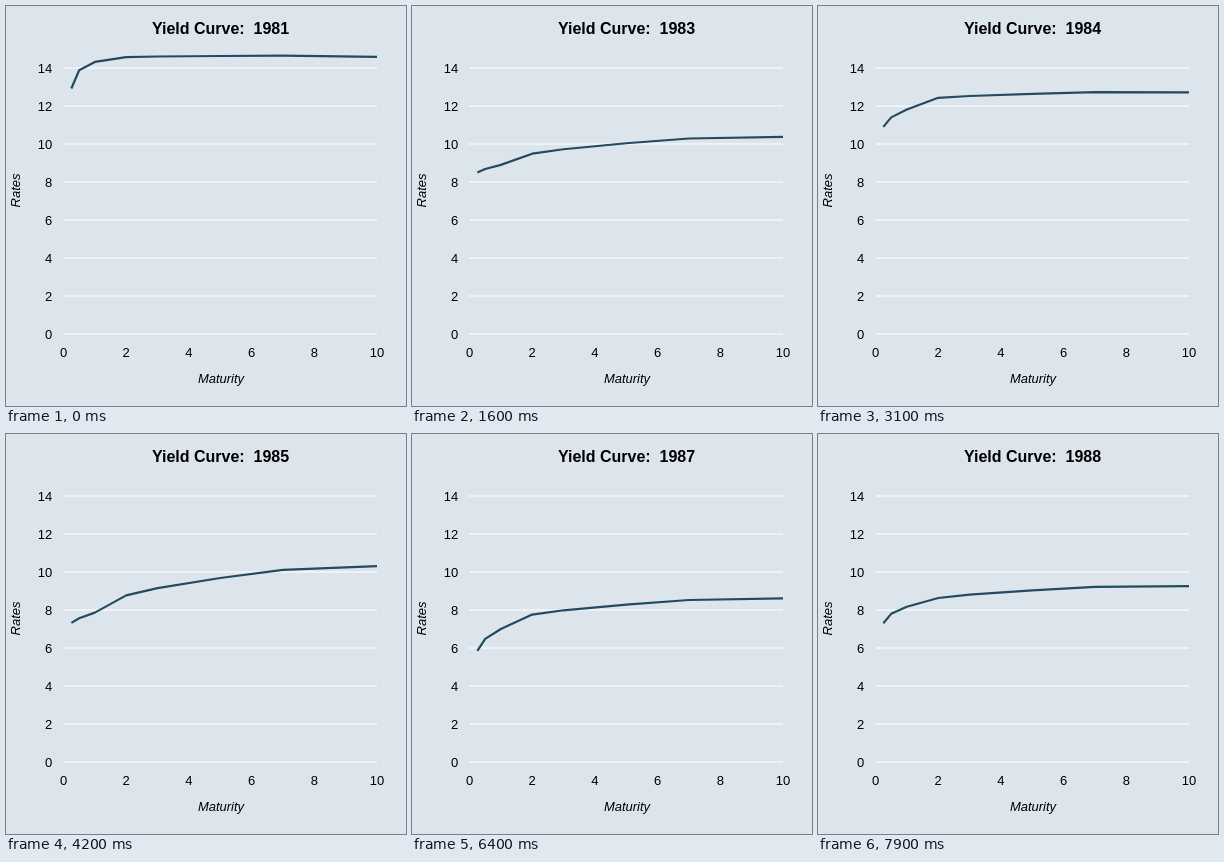
An HTML page for the animation above (8 s loop, 400 by 400 pixels).

```html
<!DOCTYPE html>
<html lang="en">
<head>
<meta charset="utf-8">
<title>Yield Curve</title>
<style>
  html, body { margin: 0; width: 100%; height: 100%; overflow: hidden; background: #dde5ec; }
  svg { display: block; width: 400px; height: 400px; }
  text { font: 13px "Liberation Sans", Arial, sans-serif; fill: #000; text-anchor: middle; white-space: pre; }
  .title { font-size: 16px; font-weight: bold; }
  .axis { font-style: italic; }
  .end { text-anchor: end; }
  .grid { stroke: #f6f8fa; stroke-width: 1.6; }
  .curve { fill: none; stroke: #234b60; stroke-width: 2.2; stroke-linejoin: round; }
</style>
</head>
<body>
<svg viewBox="0 0 400 400">
  <text class="title" id="title" x="214.5" y="28"></text>
  <g id="axes"></g>
  <text class="axis" x="215" y="377">Maturity</text>
  <text class="axis" transform="translate(14 184.5) rotate(-90)">Rates</text>
  <polyline class="curve" id="curve"/>
</svg>
<script>
const STEP = 100, MONTHS = 80, FIRST_YEAR = 1981;
const MATURITIES = [0.25, 0.5, 1, 2, 3, 5, 7, 10];

// Turning points: month, then the 3-month, 1-year, 2-year and 10-year rates
const turns = [
  [0, 12.92, 14.32, 14.57, 14.59],
  [4, 12.71, 13.34, 13.78, 13.62],
  [5, 13.08, 14.07, 14.47, 14.3],
  [9, 7.97, 9.32, 10.19, 10.91],
  [16, 8.5, 8.9, 9.49, 10.38],
  [19, 9.74, 10.53, 11.07, 11.85],
  [24, 9.26, 9.9, 10.64, 11.67],
  [29, 10.26, 12.08, 12.91, 13.56],
  [31, 10.9, 11.82, 12.43, 12.72],
  [35, 8.34, 9.33, 10.18, 11.5],
  [38, 8.83, 9.86, 10.71, 11.86],
  [42, 7.32, 7.86, 8.77, 10.31],
  [45, 7.4, 8.01, 8.86, 10.24],
  [51, 6.24, 6.44, 6.7, 7.3],
  [55, 5.69, 5.93, 6.33, 7.17],
  [62, 5.77, 6.03, 6.42, 7.25],
  [64, 5.85, 7, 7.76, 8.61],
  [69, 6.35, 7.59, 8.4, 9.52],
  [73, 5.84, 6.64, 7.18, 8.21],
  [79, 7.3, 8.17, 8.63, 9.26]
];

const px = m => 57.5 + m * 31.35;
const py = r => 328 - r * 19;
const mix = (a, b, t) => a + (b - a) * t;

function ratesAt(month) {
  const k = Math.max(1, turns.findIndex(p => p[0] >= month));
  const a = turns[k - 1], b = turns[k];
  const t = (month - a[0]) / (b[0] - a[0]);
  const [, m3, y1, y2, y10] = a.map((v, i) => mix(v, b[i], t));

  // The steeper the first year, the sooner the short end bends
  const steep = (y1 - m3) / (y2 - m3);
  const m6 = mix(m3, y1, 0.4 + 0.4 * steep ** 2);
  // The long end bows slightly above a straight blend
  const long = (share, bow) => mix(y2, y10, share) + bow;
  return [m3, m6, y1, y2, long(0.23, 0.03), long(0.56, 0.05), long(0.83, 0.06), y10];
}

let axes = "";
for (let r = 0; r <= 14; r += 2) {
  axes += `<line class="grid" x1="57.5" x2="371" y1="${py(r)}" y2="${py(r)}"/>` +
    `<text class="end" x="46.3" y="${py(r) + 4.7}">${r}</text>`;
}
for (let m = 0; m <= 10; m += 2) axes += `<text x="${px(m)}" y="351">${m}</text>`;
document.getElementById("axes").innerHTML = axes;

const title = document.getElementById("title");
const curve = document.getElementById("curve");
let shown = -1;

function draw(month) {
  // January still carries the previous year's label
  title.textContent = `Yield Curve:\u00a0 ${FIRST_YEAR + Math.floor((month + 11) / 12)}`;
  curve.setAttribute("points",
    ratesAt(month).map((r, i) => `${px(MATURITIES[i])},${py(r).toFixed(2)}`).join(" "));
}

const start = performance.now();
function tick() {
  const month = Math.floor((performance.now() - start) / STEP) % MONTHS;
  if (month !== shown) draw(shown = month);
  requestAnimationFrame(tick);
}
tick();
</script>
</body>
</html>
```
